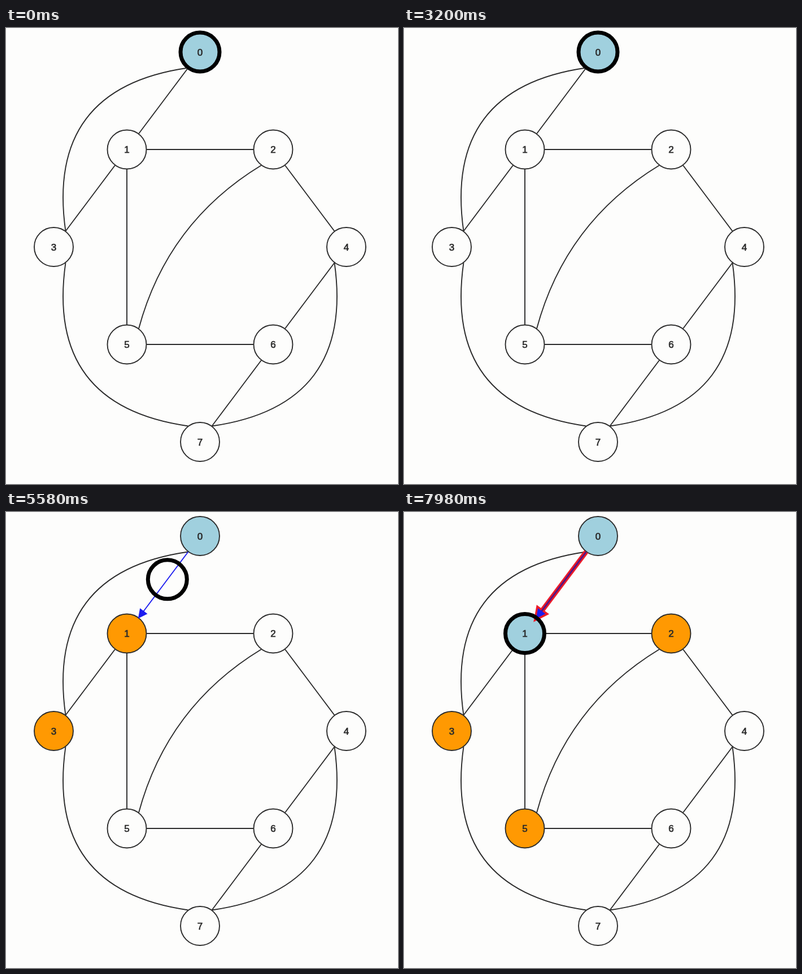
Write an HTML page with a canvas that moves like this. It is 694 by 807 pixels and loops after 8000 ms.

```html
<!DOCTYPE html>
<html lang="en">
<head>
<meta charset="utf-8">
<title>Depth-first graph traversal</title>
<style>
  html, body { margin: 0; width: 100%; height: 100%; overflow: hidden; background: #fdfdfc; }
  canvas { display: block; }
</style>
</head>
<body>
<canvas id="stage" width="694" height="807"></canvas>
<script>
const ctx = document.getElementById('stage').getContext('2d');
const LOOP = 8000, STEP = 900, RADIUS = 34.5, LINE = 1.9, UNIT = 1.73;
const INK = '#2b2b2b', PAPER = '#fdfdfc', ORANGE = '#ff9902', VISITED = '#a0d0de';
const BLUE = '#1c1cf0', RED = '#ee1c28', PURPLE = '#5a1480';

const nodes = [[343.5, 42.5], [214, 215], [473, 215], [84.5, 387.5],
               [602.5, 387.5], [214, 560], [473, 560], [343.5, 732.5]];
// from, to, bend
const edges = [[0, 3, .5], [1, 2, 0], [1, 3, 0], [1, 5, 0], [2, 4, 0], [2, 5, .2],
               [3, 7, .5], [4, 6, 0], [4, 7, -.5], [5, 6, 0], [6, 7, 0]];

// Moments at which the traversal advances
const MOVE = 5180;
const walk = { near0: MOVE - 2 * STEP, check0: MOVE - STEP, link: MOVE - 10,
               visit1: MOVE + STEP, near1: MOVE + 2 * STEP, check1: MOVE + 3 * STEP };

function rimPoints(a, b) {
  const [x1, y1] = nodes[a], [x2, y2] = nodes[b];
  const d = Math.hypot(x2 - x1, y2 - y1);
  const ux = (x2 - x1) / d * 35, uy = (y2 - y1) / d * 35;
  return [x1 + ux, y1 + uy, x2 - ux, y2 - uy];
}

function drawEdge(a, b, bend, color = INK, width = LINE) {
  const [x1, y1, x2, y2] = rimPoints(a, b);
  const cx = (x1 + x2) / 2 - (y2 - y1) * bend;
  const cy = (y1 + y2) / 2 + (x2 - x1) * bend;
  ctx.strokeStyle = color;
  ctx.lineWidth = width;
  ctx.beginPath();
  ctx.moveTo(x1, y1);
  ctx.quadraticCurveTo(cx, cy, x2, y2);
  ctx.stroke();
}

function drawArrowHead(a, b, color, width) {
  const [x1, y1, x2, y2] = rimPoints(a, b);
  ctx.save();
  ctx.translate(x2, y2);
  ctx.rotate(Math.atan2(y2 - y1, x2 - x1));
  ctx.beginPath();
  ctx.moveTo(0, 0);
  ctx.lineTo(-8 * UNIT, -4 * UNIT);
  ctx.lineTo(-8 * UNIT, 4 * UNIT);
  ctx.closePath();
  ctx.fillStyle = ctx.strokeStyle = color;
  ctx.lineWidth = width;
  ctx.fill();
  ctx.stroke();
  ctx.restore();
}

function drawTreeEdge(t) {
  const linked = t >= walk.link;
  const checked = t >= walk.check0 && !linked || t >= walk.check1;
  if (checked) {
    const pulse = Math.abs((t / 420 + 1) % 4 - 2);
    const glow = (3 + pulse) * UNIT;
    drawEdge(0, 1, 0, RED, glow);
    if (linked) drawArrowHead(0, 1, RED, glow);
  }
  const shaft = !linked ? INK : checked ? PURPLE : BLUE;
  drawEdge(0, 1, 0, shaft, checked ? 3 : LINE);
  if (linked) drawArrowHead(0, 1, BLUE, UNIT);
}

function nodeColor(i, t) {
  if (i === 0 || i === 1 && t >= walk.visit1) return VISITED;
  if ((i === 1 || i === 3) && t >= walk.near0) return ORANGE;
  if ((i === 2 || i === 5) && t >= walk.near1) return ORANGE;
  return PAPER;
}

function circle(x, y, color, width) {
  ctx.beginPath();
  ctx.arc(x, y, RADIUS, 0, 2 * Math.PI);
  ctx.strokeStyle = color;
  ctx.lineWidth = width;
}

function drawNode([x, y], i, t) {
  circle(x, y, INK, LINE);
  ctx.fillStyle = nodeColor(i, t);
  ctx.fill();
  ctx.stroke();
  ctx.fillStyle = ctx.strokeStyle = INK;
  ctx.lineWidth = .7;
  ctx.fillText(i, x, y + 6);
  ctx.strokeText(i, x, y + 6);
}

function drawCursor(t) {
  const p = Math.min(1, Math.max(0, (t - MOVE) / STEP));
  const [[x1, y1], [x2, y2]] = nodes;
  circle(x1 + (x2 - x1) * p, y1 + (y2 - y1) * p, '#000', 7);
  ctx.stroke();
}

function frame(now) {
  const t = now % LOOP;
  ctx.fillStyle = PAPER;
  ctx.fillRect(0, 0, 694, 807);
  ctx.font = '17px "Liberation Sans", Arial, sans-serif';
  ctx.textAlign = 'center';
  edges.forEach(edge => drawEdge(...edge));
  nodes.forEach((node, i) => drawNode(node, i, t));
  drawTreeEdge(t);
  drawCursor(t);
  requestAnimationFrame(frame);
}
requestAnimationFrame(frame);
</script>
</body>
</html>
```
